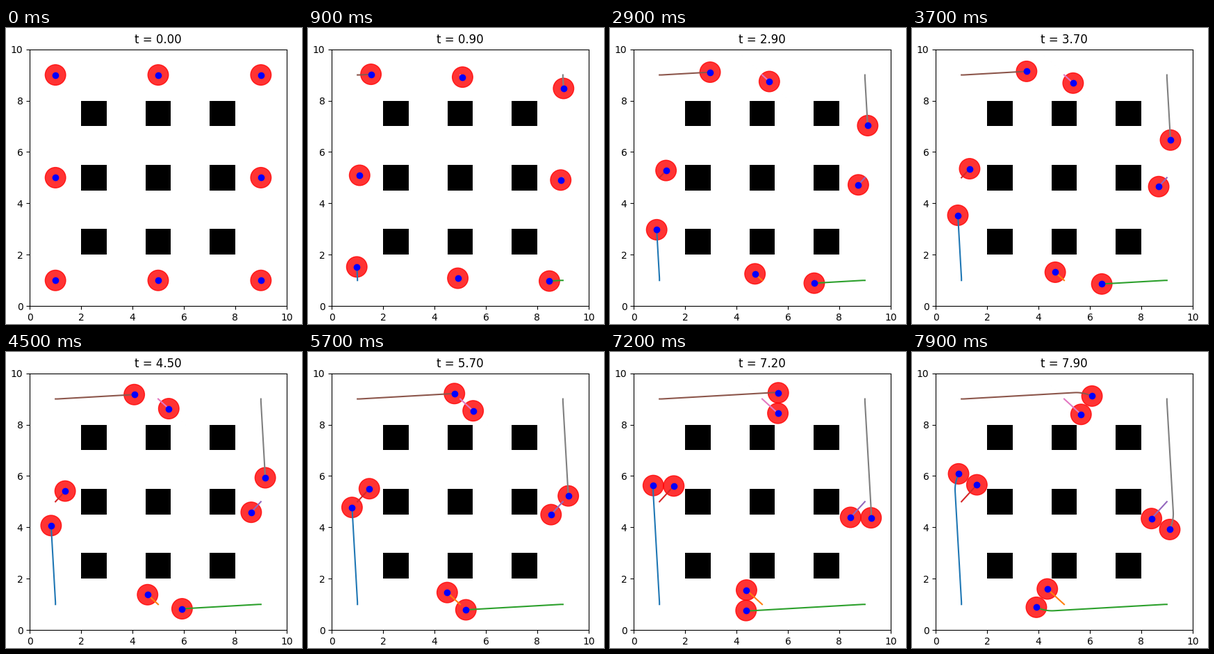
Write a matplotlib script that moves like this. It is 426 px wide and 426 px high and loops after 8000 ms.

```python
from itertools import product

import numpy as np
import matplotlib.pyplot as plt
from matplotlib.animation import FuncAnimation
from matplotlib.patches import Circle, Rectangle

SIZE, DPI = 426, 100
FRAMES, DT = 80, 0.1
t = np.arange(FRAMES) * DT


def corner_motion():
    """Quick start, slow-down while passing a neighbour, then a turn inward."""
    speed, lag = 0.73, 0.18
    delay = 0.6 / (1 + np.exp((5.95 - t) / 0.8))
    along = speed * (t - lag * (1 - np.exp(-t / lag))) - delay
    drift = 0.057 * np.maximum(along - 0.08, 0)
    turn = 0.37 * np.maximum(along - 4.4, 0) ** 2
    return along, drift - turn


def middle_motion():
    """Diagonal creep inward that slowly loses speed."""
    along = 1.685 * (1 - np.exp(-t / 16))
    return along, -0.915 * along


def agent_path(dx, dy):
    """Clockwise path of the agent standing at (dx, dy) from the centre."""
    if dx and dy:
        outward = np.array([dx + dy, dy - dx]) / 2
        along, out = corner_motion()
    else:
        outward = np.array([dx, dy])
        along, out = middle_motion()
    heading = np.array([outward[1], -outward[0]])
    start = 5 + 4 * np.array([dx, dy])
    return start + np.outer(along, heading) + np.outer(out, outward)


paths = [agent_path(dx, dy) for dy, dx in product((-1, 0, 1), repeat=2) if dx or dy]

fig = plt.figure(figsize=(SIZE / DPI, SIZE / DPI), dpi=DPI)
ax = fig.add_axes([34.21 / SIZE, 25.8 / SIZE, 369.6 / SIZE, 369.6 / SIZE])
ax.set(xlim=(0, 10), ylim=(0, 10))
title = ax.set_title("t = 0.00")

for corner in product((2, 4.5, 7), repeat=2):
    ax.add_patch(Rectangle(corner, 1, 1, facecolor="k", edgecolor="none"))

bodies, trails, dots = [], [], []
for i, path in enumerate(paths):
    bodies.append(ax.add_patch(Circle(path[0], 0.4, color="r", alpha=0.8)))
    trails += ax.plot([], [], color=f"C{i}", lw=1.5, zorder=2)
    dots += ax.plot([], [], "bo", ms=6, zorder=3)


def update(n):
    title.set_text(f"t = {n * DT:.2f}")
    for path, body, trail, dot in zip(paths, bodies, trails, dots):
        body.center = path[n]
        trail.set_data(*path[:n + 1].T)
        dot.set_data(*path[n:n + 1].T)
    return [title, *bodies, *trails, *dots]


anim = FuncAnimation(fig, update, frames=FRAMES, interval=100, repeat=True,
                     repeat_delay=0, blit=False)
plt.show()
```
